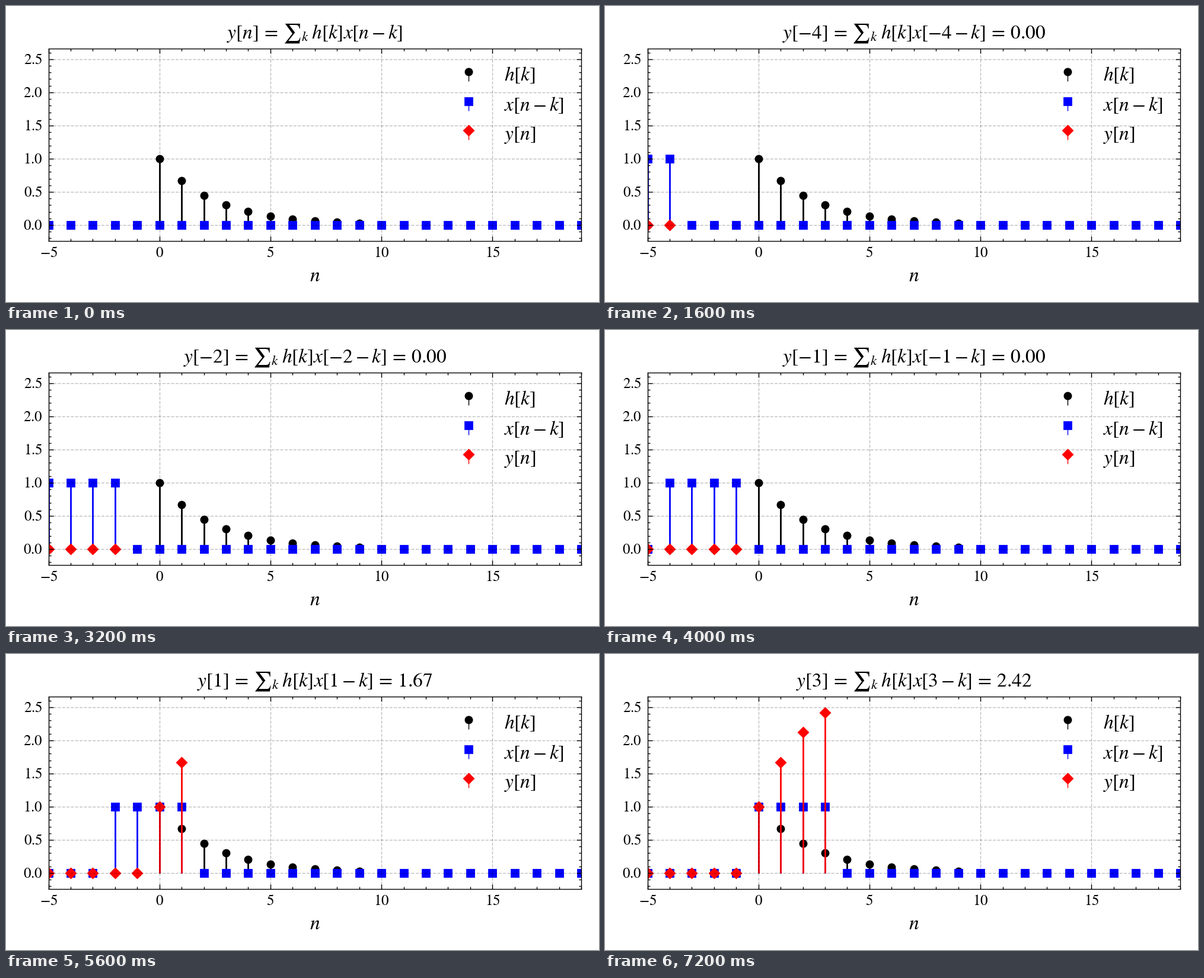
These frames come from a looping animation (1000 px wide and 500 px high, 8000 ms). A matplotlib script:

```python
import numpy as np
import matplotlib.pyplot as plt
from matplotlib.animation import FuncAnimation
from matplotlib.ticker import FormatStrFormatter, MultipleLocator

plt.rcParams.update({
    "font.family": "Liberation Serif", "mathtext.fontset": "stix",
    "axes.linewidth": 0.5, "lines.linewidth": 0.5,
    "legend.fontsize": 12, "legend.frameon": False,
})

FIRST, LAST, PULSE, TAPS = -5, 19, 4, 10
STEPS, STEP_MS = 10, 800
WIDTH, HEIGHT, DPI = 1000, 500, 200
EQUALS = r"\,=\,"
SUM = r"{\sum}_k\:"

n = np.arange(FIRST, LAST + 1)


def impulse_response(k):
    return np.where((k >= 0) & (k < TAPS), np.exp(-0.4 * k), 0)


def shifted_pulse(now):
    return ((now - n >= 0) & (now - n < PULSE)).astype(float)


h = impulse_response(n)
y = np.array([h @ shifted_pulse(m) for m in n])
peak = impulse_response(np.arange(PULSE)).sum()

fig, ax = plt.subplots(figsize=(WIDTH / DPI, HEIGHT / DPI), dpi=DPI)
fig.subplots_adjust(left=71.55 / WIDTH, right=970 / WIDTH,
                    top=1 - 71.64 / HEIGHT, bottom=1 - 397.05 / HEIGHT)


def add_stem(values, color, marker, label):
    stem = ax.stem(n, values, linefmt=color, markerfmt=color + marker,
                   basefmt=" ", label=label)
    stem.markerline.set_markersize(4)
    stem.markerline.set_markeredgewidth(1)
    stem.stemlines.set_linewidth(1)
    return stem


def update_stem(stem, x, values):
    stem.markerline.set_data(x, values)
    stem.stemlines.set_segments([[(a, 0), (a, b)] for a, b in zip(x, values)])


add_stem(h, "k", "o", "$h[k]$")
x_stem = add_stem(np.zeros(len(n)), "b", "s", "$x[n-k]$")
y_stem = add_stem(np.full(len(n), np.nan), "r", "D", "$y[n]$")

ax.set_xlim(FIRST, LAST)
ax.set_ylim(-0.1 * peak, 1.1 * peak)
ax.set_xlabel("$n$", fontsize=12, labelpad=4.7)
title = ax.set_title("", fontsize=12, y=1, pad=6)
for axis, major, minor, fmt in ((ax.xaxis, 5, 1, "$%d$"), (ax.yaxis, 0.5, 0.1, "$%.1f$")):
    axis.set_major_locator(MultipleLocator(major))
    axis.set_minor_locator(MultipleLocator(minor))
    axis.set_major_formatter(FormatStrFormatter(fmt))
ax.tick_params(which="both", direction="in", top=True, right=True, width=0.5, labelsize=9)
ax.tick_params(which="major", length=3)
ax.tick_params(which="minor", length=1.5)
ax.grid(True, color="k", alpha=0.25, linestyle="--", linewidth=0.5)
ax.set_axisbelow(False)
ax.legend(loc="upper right", labelspacing=0.54, borderaxespad=0.47)


def update(step):
    now = FIRST + step - 1
    if step == 0:
        title.set_text(rf"$y[n]{EQUALS}{SUM}h[k]x[n-k]$")
        update_stem(x_stem, n, np.zeros(len(n)))
    else:
        title.set_text(rf"$y[{now}]{EQUALS}{SUM}h[k]x[{now}-k]{EQUALS}{y[step - 1]:.2f}$")
        update_stem(x_stem, n, shifted_pulse(now))
    update_stem(y_stem, n[:step], y[:step])
    return x_stem.markerline, x_stem.stemlines, y_stem.markerline, y_stem.stemlines, title


anim = FuncAnimation(fig, update, frames=STEPS, interval=STEP_MS, repeat=True, blit=False)
plt.show()
```
